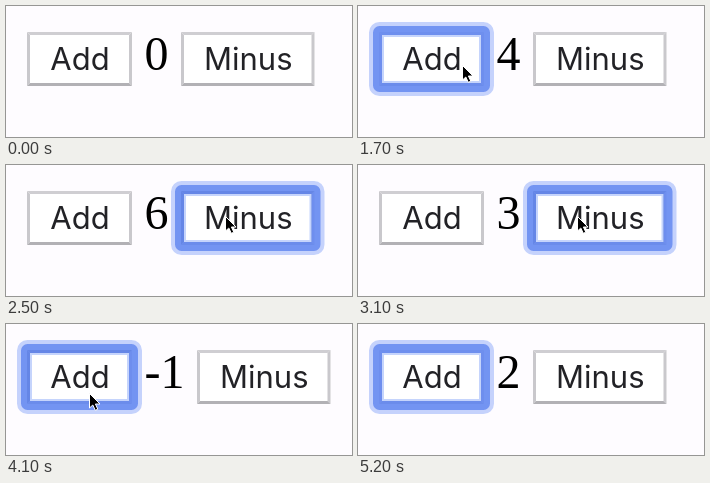
Write an HTML page that moves like this. It is 346x131 px and loops after 6.2 s.

```html
<!DOCTYPE html>
<html lang="en">
<head>
<meta charset="utf-8">
<title>Counter</title>
<style>
  html, body { margin: 0; width: 100%; height: 100%; overflow: hidden; background: #fefcff; }
  svg { display: block; width: 346px; height: 131px; }
  .label { font: 31px Inter, Roboto, sans-serif; fill: #222226; text-anchor: middle; }
  #count { font: 48px "Liberation Serif", "Times New Roman", serif; fill: #000; }
  .face { fill: #fff; }
  .top { fill: #cfced2; }
  .side { fill: #c9c8cc; }
  .bottom { fill: #b2b1b5; }
  .pressed .top, .pressed .left { fill: #77767c; }
  .ring { visibility: hidden; fill: none; }
  .focused .ring { visibility: visible; }
  .glow { stroke: #3f70f5; stroke-opacity: .3; stroke-width: 15; }
  .band { stroke: #668af2; stroke-opacity: .86; stroke-width: 9; }
</style>
</head>
<body>
<svg viewBox="0 0 346 131">
  <g id="add"></g>
  <text id="count" x="138.5" y="64">0</text>
  <g id="minus"></g>
  <path id="cursor" d="M0.5 0.5V15L3.8 12L6.3 17.3L8.8 16.2L6.4 11H11Z"
        fill="#000" stroke="#fff" stroke-width="1" stroke-linejoin="round"/>
</svg>
<script>
const LOOP = 6200, TICK = 100;
const $ = id => document.getElementById(id);

function buildButton(id, x, w, text) {
  const y = 26, h = 54, b = 3, r = x + w, d = y + h;
  const outline = (cls, out, rx) =>
    `<rect class="ring ${cls}" x="${x - out}" y="${y - out}" width="${w + 2 * out}" height="${h + 2 * out}" rx="${rx}"/>`;
  $(id).innerHTML = `
    <rect class="face" x="${x}" y="${y}" width="${w}" height="${h}"/>
    <path class="side left" d="M${x} ${y}l${b} ${b}V${d - b}L${x} ${d}Z"/>
    <path class="side" d="M${r} ${y}l${-b} ${b}V${d - b}L${r} ${d}Z"/>
    <path class="top" d="M${x} ${y}H${r}l${-b} ${b}H${x + b}Z"/>
    <path class="bottom" d="M${x} ${d}H${r}l${-b} ${-b}H${x + b}Z"/>
    <text class="label" x="${x + w / 2 + 0.5}" y="64">${text}</text>
    ${outline("glow", 2.5, 3)}${outline("band", 1.5, 2)}`;
}
buildButton("add", 21, 105, "Add");
buildButton("minus", 175, 133.5, "Minus");

// Mouse events: [time, button, pressed, count]
const clicks = [
  [0, "", 0, 0],
  [800, "add", 1, 0], [900, "add", 0, 1], [1000, "add", 1, 1], [1100, "add", 0, 2],
  [1200, "add", 0, 3], [1400, "add", 1, 3], [1700, "add", 0, 4], [1800, "add", 1, 4],
  [1900, "add", 0, 5], [2000, "add", 1, 5], [2100, "add", 0, 6],
  [2500, "minus", 1, 6], [2700, "minus", 0, 5], [2800, "minus", 1, 5], [2900, "minus", 0, 4],
  [3000, "minus", 0, 3], [3100, "minus", 1, 3], [3200, "minus", 0, 2], [3300, "minus", 0, 1],
  [3400, "minus", 1, 1], [3500, "minus", 0, 0], [3600, "minus", 0, -1],
  [4100, "add", 1, -1], [4200, "add", 0, 0], [4300, "add", 1, 0], [4400, "add", 0, 1],
  [4500, "add", 1, 1], [4600, "add", 0, 2]
];

// Cursor tip: [time, x, y]; without a position it is hidden
const moves = [
  [0], [200, 207, 80], [300, 182, 74], [400, 144, 65], [500, 113, 60], [600, 104, 59],
  [2200, 144, 58], [2300, 199, 53], [2400, 219, 51],
  [3800, 207, 55], [3900, 156, 67], [4000, 99, 72], [4100, 83, 69],
  [4700, 90, 72], [4800, 121, 72], [4900, 172, 70], [5000, 222, 67], [5100, 250, 65],
  [5200]
];

const latest = (list, t) => list.findLast(step => step[0] <= t);

function render(t) {
  const [, active, pressed, count] = latest(clicks, t);
  for (const id of ["add", "minus"]) {
    $(id).classList.toggle("focused", id === active);
    $(id).classList.toggle("pressed", id === active && !!pressed);
  }
  $("count").textContent = count;
  $("minus").setAttribute("transform", `translate(${count < 0 ? 16 : 0} 0)`);

  const [, x, y] = latest(moves, t);
  const cursor = $("cursor");
  cursor.style.visibility = x === undefined ? "hidden" : "visible";
  if (x !== undefined) cursor.setAttribute("transform", `translate(${x} ${y})`);
}

const start = performance.now();
function frame() {
  const t = (performance.now() - start) % LOOP;
  render(Math.floor(t / TICK) * TICK);
  requestAnimationFrame(frame);
}
render(0);
requestAnimationFrame(frame);
</script>
</body>
</html>
```
